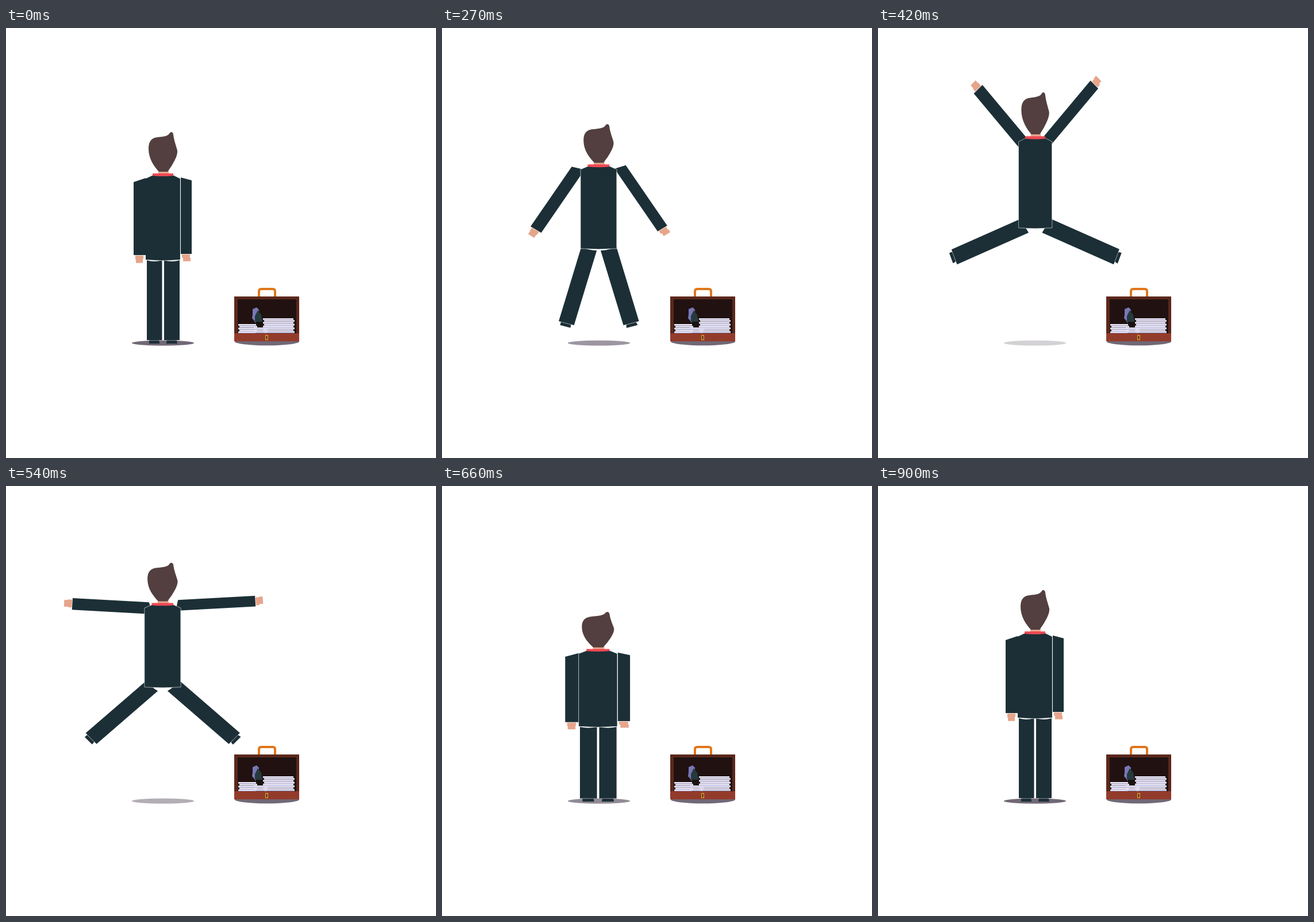
Write an HTML page with a canvas that moves like this. It is 748 px wide and 748 px high and loops after 1050 ms.

```html
<!DOCTYPE html>
<html lang="en">
<head>
<meta charset="utf-8">
<title>Jump</title>
<style>
  html, body { margin: 0; width: 100%; height: 100%; overflow: hidden; background: #fff; }
  canvas { display: block; width: 748px; height: 748px; }
</style>
</head>
<body>
<canvas id="stage" width="748" height="748"></canvas>
<script>
const ctx = document.getElementById('stage').getContext('2d');
const SUIT = '#1c2f36', SKIN = '#e6a58b', HAIR = '#533f3f', RED = '#ef4a55', SHADE = '#716876';

// Beats of the jump in ms; poses are sampled every STEP.
const LOOP = 1050, STEP = 30, CROUCH = 150, APEX = 420, LAND = 660, REST = 900;

// Moves from a to b between two times, eased by a power.
function tween(t, t0, t1, a, b, power = 1) {
  const u = Math.max(0, Math.min(1, (t - t0) / (t1 - t0)));
  return a + (b - a) * u ** power;
}

// Rest -> crouch -> apex -> landing -> rest, with easing for the way up and down.
function jump(t, rest, crouch, apex, land, up, down) {
  if (t < CROUCH) return tween(t, 0, CROUCH, rest, crouch);
  if (t < APEX) return tween(t, CROUCH, APEX, crouch, apex, up);
  if (t < LAND) return tween(t, APEX, LAND, apex, land, down);
  return tween(t, LAND, REST, land, rest);
}

function poseAt(t) {
  const top = 510;
  return {
    sx: jump(t, 1, 1.2, .967, 1.117, .5, .9),
    sy: jump(t, 1, .8, 1.06, .897, .5, .9),
    arm: jump(t, 0, -10, 137.5, 0, 1.53, 1.64),
    leg: jump(t, 0, 0, 68, 0, 1.8, 1.7),
    lift: t < top ? tween(t, CROUCH, top, 0, 60, .85) : tween(t, top, LAND, 60, 0, 2),
    shade: t < APEX ? tween(t, CROUCH, APEX, 1, .3) : tween(t, APEX, 780, .3, 1)
  };
}

const shapes = {
  armL: 'M222 268L243 261V395H222Z',
  handL: 'M225 395.7h14v6h-1v7h-12v-6h-1z',
  armR: 'M304 260L323 265V393H304Z',
  handR: 'M306 393.7h14v6h1v6h-13v-6h-2z',
  legL: 'M245 404Q258 408 271.5 404V543H245Z',
  footL: 'M249 543.5h17q1 2 1 5.5h-18z',
  legR: 'M275 404Q288 408 302 404V543H275Z',
  footR: 'M280 543.5h17l1 5.5h-19q0-3 1-5.5z',
  torso: 'M243 262L256 256H291L303 262V403Q273 406 243 403Z',
  neck: 'M265 247h18v6.5h-18z',
  collar: 'M255 253H291V257Q273 259 255 257Z',
  hair: 'M248 210C248 196 254 191 264 190C274 189 281 188 284 184C286 180 290 180 291 185' +
        'C292 195 296 205 298 213C299 222 292 233 288 240L281 250H266' +
        'C258 241 248 228 248 210Z'
};
for (const k in shapes) shapes[k] = new Path2D(shapes[k]);

function fill(path, color) {
  ctx.fillStyle = color;
  ctx.fill(path);
}

function rect(color, x, y, w, h) {
  ctx.fillStyle = color;
  ctx.fillRect(x, y, w, h);
}

function ellipse(color, x, y, rx, ry) {
  ctx.fillStyle = color;
  ctx.beginPath();
  ctx.ellipse(x, y, rx, ry, 0, 0, 2 * Math.PI);
  ctx.fill();
}

function limb(px, py, degrees, part, end, endColor) {
  ctx.save();
  ctx.translate(px, py);
  ctx.rotate(degrees * Math.PI / 180);
  ctx.translate(-px, -py);
  fill(shapes[part], SUIT);
  fill(shapes[end], endColor);
  ctx.restore();
}

function seam(alpha, path) {
  ctx.globalAlpha = alpha;
  ctx.stroke(new Path2D(path));
  ctx.globalAlpha = 1;
}

function drawMan(p) {
  ctx.globalAlpha = p.shade;
  ellipse(SHADE, 273, 548, 54, 4.5);
  ctx.globalAlpha = 1;

  ctx.save();
  ctx.translate(288, 549 - p.lift);
  ctx.scale(p.sx, p.sy);
  ctx.translate(-288, -549);
  limb(244, 273.3, p.arm, 'armL', 'handL', SKIN);
  limb(302.7, 267.8, -p.arm, 'armR', 'handR', SKIN);
  limb(261, 400, p.leg, 'legL', 'footL', SUIT);
  limb(285.5, 400, -p.leg, 'legR', 'footR', SUIT);
  fill(shapes.torso, SUIT);

  // Thin seams around the jacket; the left one closes at rest.
  ctx.strokeStyle = '#fff';
  ctx.lineWidth = .8;
  seam(Math.min(.7, Math.abs(p.sx - 1) * 20), 'M256 256L243 262V403');
  seam(.7, 'M291 256L303.4 262V403.4Q273 406 243 403.4');

  fill(shapes.neck, SKIN);
  fill(shapes.collar, RED);
  fill(shapes.hair, HAIR);
  ctx.restore();
}

function papers(x, y, w, count) {
  for (let i = 0; i < count; i++) {
    const left = x + i % 2 * 2, top = y + i * 3.2;
    rect('#f0eefb', left, top, w - 2, 2.6);
    rect('#aaa6d6', left, top + 2.3, w - 2, .9);
  }
}

function drawCase() {
  ellipse(SHADE, 454, 545.5, 56, 6.8);
  ctx.strokeStyle = '#df761b';
  ctx.lineWidth = 4;
  ctx.stroke(new Path2D('M440 467V458Q440 454 444 454H464Q468 454 468 458V467'));
  rect('#5b281b', 397, 467, 113, 78);
  rect('#211211', 403, 472, 102, 59);
  fill(new Path2D('M429 489L436 486L440 490L439 501L434 513L431 508L428 505L429 498Z'), '#7977b5');
  fill(new Path2D('M438 491L444 499L446 511H433V501Z'), '#263a3e');
  fill(new Path2D('M435 511H446L444 521H437Z'), '#18130f');
  papers(447, 505, 55, 8);
  papers(404, 515, 33, 5);
  papers(431, 521, 25, 3);
  rect('#933b2b', 397, 531, 113, 14);
  rect('#dc9a30', 451, 534, 5, 9);
  rect('#37221a', 452.5, 535.5, 2, 6);
}

function draw(now) {
  const t = Math.min(REST, Math.floor(now % LOOP / STEP) * STEP);
  ctx.clearRect(0, 0, 748, 748);
  drawCase();
  drawMan(poseAt(t));
}

const start = performance.now();
function tick() {
  draw(performance.now() - start);
  requestAnimationFrame(tick);
}
tick();
</script>
</body>
</html>
```
